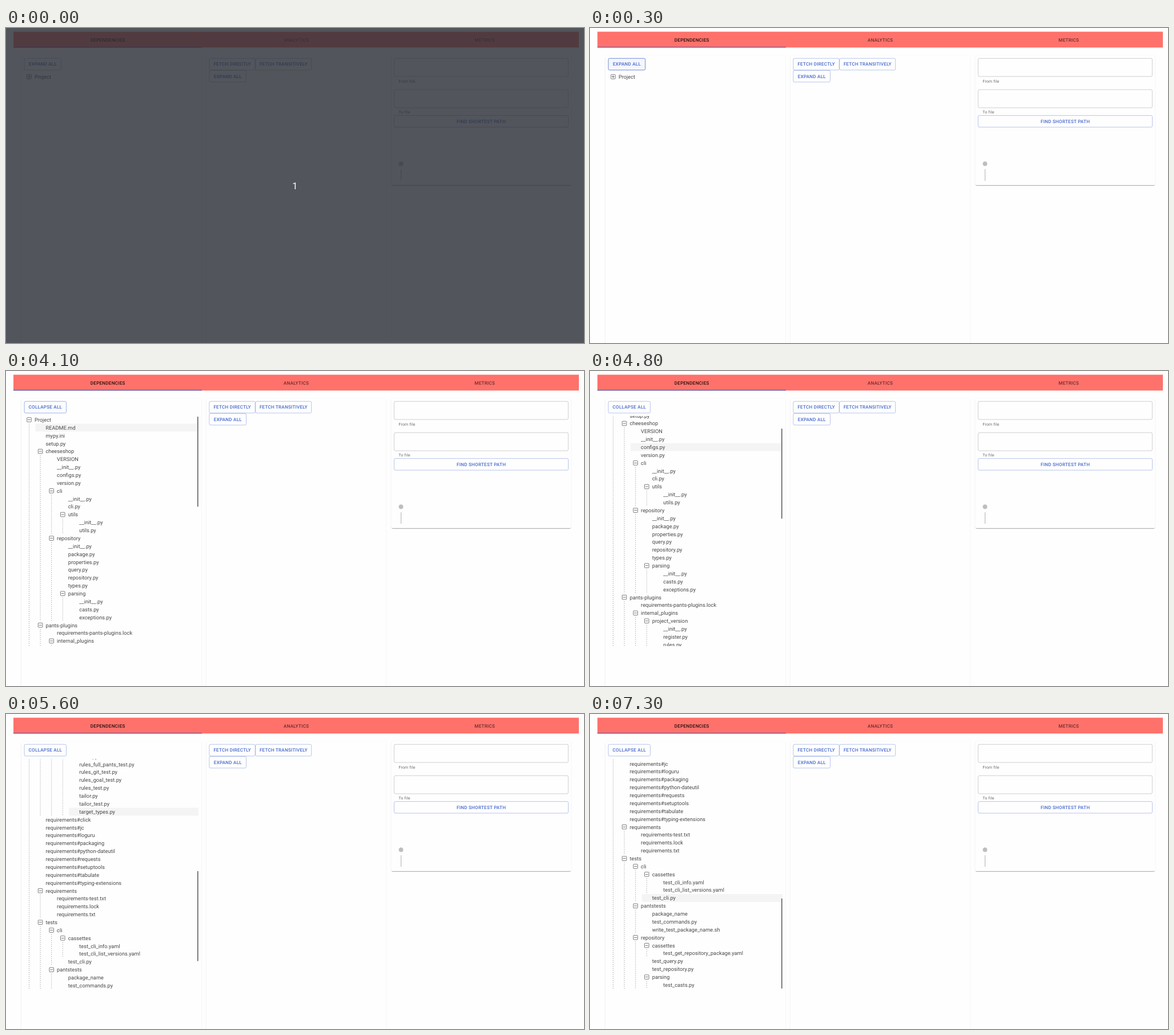
Recreate the animation shown at these times as an HTML page with a canvas. Size 1012x553 px, loop 8000 ms.

```html
<!DOCTYPE html>
<html lang="en">
<head>
<meta charset="utf-8">
<title>Dependencies</title>
<style>
html, body { margin: 0; width: 100%; height: 100%; overflow: hidden; }
canvas { display: block; }
</style>
</head>
<body>
<canvas id="stage" width="1012" height="553"></canvas>
<script>
const ctx = document.getElementById('stage').getContext('2d');
const LOOP = 8000, STEP = 100;
const ROW = 13.87, INDENT = 19.6, TOP = 78.6, BOTTOM = 483;
const blue = a => `rgba(70,104,207,${a})`;
const black = a => `rgba(0,0,0,${a})`;

// Each line starts with its depth.
const rows = `0Project
1README.md
1mypy.ini
1setup.py
1cheeseshop
2VERSION
2__init__.py
2configs.py
2version.py
2cli
3__init__.py
3cli.py
3utils
4__init__.py
4utils.py
2repository
3__init__.py
3package.py
3properties.py
3query.py
3repository.py
3types.py
3parsing
4__init__.py
4casts.py
4exceptions.py
1pants-plugins
2requirements-pants-plugins.lock
2internal_plugins
3project_version
4__init__.py
4register.py
4rules.py
4rules_full_pants_test.py
4rules_git_test.py
4rules_goal_test.py
4rules_test.py
4tailor.py
4tailor_test.py
4target_types.py
1requirements#click
1requirements#jc
1requirements#loguru
1requirements#packaging
1requirements#python-dateutil
1requirements#requests
1requirements#setuptools
1requirements#tabulate
1requirements#typing-extensions
1requirements
2requirements-test.txt
2requirements.lock
2requirements.txt
1tests
2cli
3cassettes
4test_cli_info.yaml
4test_cli_list_versions.yaml
3test_cli.py
2pantstests
3package_name
3test_commands.py
3write_test_package_name.sh
2repository
3cassettes
4test_get_repository_package.yaml
3test_query.py
3test_repository.py
3parsing
4test_casts.py`.split('\n').map(s => ({ depth: +s[0], name: s.slice(1) }));

rows.forEach((row, i) => {
  row.end = i + 1;
  while (row.end < rows.length && rows[row.end].depth > row.depth) row.end++;
  row.open = row.end > i + 1;
});

// Piecewise linear value through [time, value] pairs.
function track(keys, t) {
  const n = keys.findIndex(k => k[0] > t);
  if (n < 0) return keys[keys.length - 1][1];
  if (n === 0) return keys[0][1];
  const [t0, a] = keys[n - 1], [t1, b] = keys[n];
  return a + (b - a) * (t - t0) / (t1 - t0);
}
const veilKeys = [[0, .82], [300, 0]];
const focusKeys = [[0, 0], [100, 0], [300, 1], [3900, 1], [4200, 0]];
const scrollKeys = [[4700, 0], [4800, 49], [4900, 49], [5000, 130], [5200, 310], [5300, 360],
  [5400, 360], [5500, 420], [5600, 455], [5700, 455], [5800, 520], [5900, 565.4], [6000, 567]];
const cursorKeys = [[3900, 63], [4300, 138], [4800, 138], [5000, 169], [6400, 174],
  [6600, 240], [6800, 240], [7300, 323]];

function text(str, x, y, size, color, weight = 400, align = 'left', spacing = 0) {
  ctx.font = `${weight} ${size}px Roboto, sans-serif`;
  ctx.letterSpacing = spacing + 'px';
  ctx.textAlign = align;
  ctx.fillStyle = color;
  ctx.fillText(str, x, y);
}

function box(x, y, w, h, stroke, fill, r = 2.3) {
  ctx.beginPath();
  ctx.roundRect(x, y, w, h, r);
  if (fill) { ctx.fillStyle = fill; ctx.fill(); }
  if (stroke) { ctx.strokeStyle = stroke; ctx.lineWidth = .75; ctx.stroke(); }
}

function button(label, x, y, w, focus = 0) {
  box(x + .3, y + .3, w - .6, 20.5, blue(.5 + .5 * focus), blue(.05 * focus));
  text(label, x + w / 2 + .1, y + 13.4, 8.09, blue(1), 500, 'center', .231);
}

function shadowed(blur, dy, alpha, draw) {
  ctx.save();
  ctx.shadowBlur = blur;
  ctx.shadowOffsetY = dy;
  ctx.shadowColor = black(alpha);
  draw();
  ctx.restore();
}

function paper(x, h) {
  const y = 48, w = 315.2;
  shadowed(1.7, .6, .12, () => box(x, y, w, h, null, '#fefefe'));
  shadowed(.6, .6, .14, () => box(x, y, w, h, null, '#fefefe'));
  shadowed(.6, 1.7, .2, () => box(x + .6, y + .6, w - 1.2, h - 1.2, null, '#fefefe'));
  box(x, y, w, h, null, '#fefefe');
}

function header() {
  ctx.fillStyle = '#ff726b';
  ctx.fillRect(13, 6.5, 990, 27.8);
  ctx.fillStyle = '#4a5bb8';
  ctx.fillRect(13, 33.1, 330, 1.2);
  ['DEPENDENCIES', 'ANALYTICS', 'METRICS'].forEach((label, i) =>
    text(label, 178.2 + 330 * i, 23.5, 8.09, black(i ? .6 : .87), 500, 'center', .231));
}

function pathForm() {
  [['From file', 53.3], ['To file', 108.2]].forEach(([label, y]) => {
    box(679.6, y, 304.8, 31.8, black(.25));
    text(label, 687.4, y + 42.2, 6.94, black(.6), 400, 'left', .231);
  });
  button('FIND SHORTEST PATH', 679.2, 153.3, 305.6);
  shadowed(1.7, .6, .35, () => box(688.1, 234.4, 7, 7, null, '#bdbdbd', 3.5));
  ctx.fillStyle = '#bdbdbd';
  ctx.fillRect(691.1, 248, 1.2, 20.2);
}

function icon(x, y, open) {
  const ink = '#555';
  box(x - 3.8, y - 3.8, 7.6, 7.6, ink, null, .8);
  ctx.fillStyle = ink;
  ctx.fillRect(x - 2.4, y - .4, 4.8, .8);
  if (!open) ctx.fillRect(x - .4, y - 2.4, .8, 4.8);
}

function tree(t) {
  const scroll = track(scrollKeys, t);
  const count = t < 3300 ? 1 : rows.length;
  const hovering = t >= 4000 && (t < 5800 || t >= 6200);
  const hover = hovering ? Math.floor((track(cursorKeys, t) - TOP + scroll) / ROW) : -1;

  ctx.save();
  ctx.beginPath();
  ctx.rect(30, 79, 308, BOTTOM - 79);
  ctx.clip();
  rows.slice(0, count).forEach((row, i) => {
    const y = TOP + ROW * i - scroll, shift = INDENT * row.depth;
    if (i === hover) {
      ctx.fillStyle = black(.04);
      ctx.fillRect(32 + shift, y, 305 - shift, ROW);
    }
    text(row.name, 49.9 + shift, y + 10.3, 9.25, '#484848');
    if (!row.open) return;
    const x = 40.5 + shift;
    icon(x, y + 6.95, t >= 3200);
    if (count === 1) return;
    ctx.beginPath();
    ctx.setLineDash([1.5, 2]);
    ctx.moveTo(x, y + ROW);
    ctx.lineTo(x, TOP + ROW * row.end - scroll);
    ctx.strokeStyle = black(.42);
    ctx.lineWidth = .8;
    ctx.stroke();
    ctx.setLineDash([]);
  });
  if (count > 1) box(334.9, 80 + .43 * scroll, 1.8, 158.3, null, '#6c6c6c', .9);
  ctx.restore();
}

function draw(t) {
  ctx.fillStyle = '#fefefe';
  ctx.fillRect(0, 0, 1012, 553);
  header();
  paper(26.8, 520);
  paper(350.6, 520);
  paper(674.4, 227.8);

  const expanded = t >= 3200;
  button(expanded ? 'COLLAPSE ALL' : 'EXPAND ALL', 31.8, 53, expanded ? 74 : 65.3, track(focusKeys, t));
  button('FETCH DIRECTLY', 355.6, 53, 81);
  button('FETCH TRANSITIVELY', 436.6, 53, 98.5);
  button('EXPAND ALL', 355.6, 74.1, 65.3);
  pathForm();
  tree(t);

  const veil = track(veilKeys, t);
  if (veil > 0) {
    ctx.fillStyle = `rgba(44,48,56,${veil})`;
    ctx.fillRect(0, 0, 1012, 553);
    text('1', 506, 282.8, 16.5, `rgba(255,255,255,${veil / .82})`, 400, 'center');
  }
}

ctx.textRendering = 'geometricPrecision';
const start = performance.now();
function frame() {
  const t = (performance.now() - start) % LOOP;
  draw(Math.floor(t / STEP) * STEP);
  requestAnimationFrame(frame);
}
frame();
</script>
</body>
</html>
```
